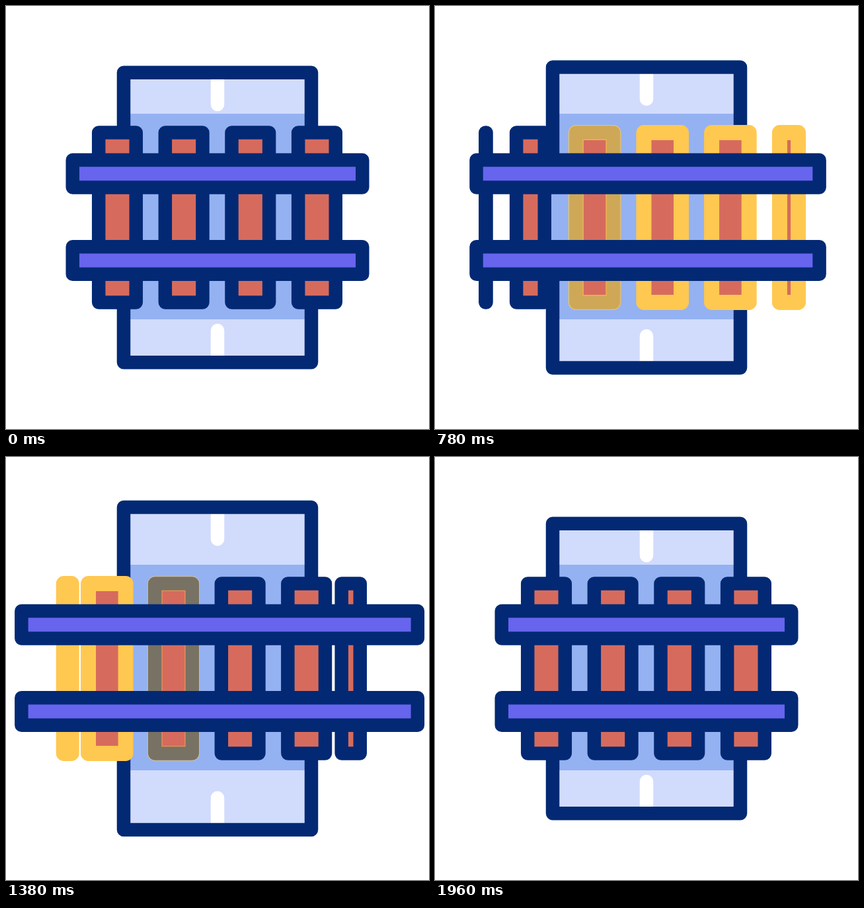
These frames come from a looping animation (640 px wide and 640 px high, 2260 ms). An HTML page with a canvas:

```html
<!DOCTYPE html>
<html lang="en">
<head>
<meta charset="utf-8">
<title>Railway crossing</title>
<style>
  html, body { margin: 0; width: 100%; height: 100%; overflow: hidden; background: #fff; }
  canvas { display: block; width: 640px; height: 640px; }
</style>
</head>
<body>
<canvas id="stage"></canvas>
<script>
const LOOP = 2260;
// Start, tightest pose, widest pose, rebound, rest
const START = 205, TIGHT = 440, WIDE = 1350, REBOUND = 1560, REST = 1950;
const NAVY = '#032974', BRICK = '#d66b5d', YELLOW = '#ffc850';
const PURPLE = '#6764ee', BLUE = '#94b1f2', PALE = '#d1dbfc';
const LINE = 20.5, GLOW = 23;
const GAP = 100.65, WIDTH = 56.6;

const canvas = document.getElementById('stage');
const ctx = canvas.getContext('2d');
const dpr = window.devicePixelRatio || 1;
canvas.width = canvas.height = 640 * dpr;

// Smooth curve through time/value pairs, flat at turning points and ends
function curve(...p) {
  const n = p.length / 2;
  const T = i => p[2 * i], V = i => p[2 * i + 1];
  const slope = i => (V(i + 1) - V(i)) / (T(i + 1) - T(i));
  const tangent = i => {
    if (i === 0 || i === n - 1) return 0;
    const a = slope(i - 1), b = slope(i);
    return a * b <= 0 ? 0 : 2 * a * b / (a + b);
  };
  return t => {
    if (t <= T(0)) return V(0);
    if (t >= T(n - 1)) return V(n - 1);
    let i = 0;
    while (t > T(i + 1)) i++;
    const h = T(i + 1) - T(i), u = (t - T(i)) / h, w = 1 - u;
    return V(i) * (1 + 2 * u) * w * w + V(i + 1) * u * u * (3 - 2 * u)
      + h * u * w * (tangent(i) * w - tangent(i + 1) * u);
  };
}

const ramp = (t, a, b) => Math.min(1, Math.max(0, (t - a) / (b - a)));

// Rails and road pinch, spread along one easing, then settle
const pinch = curve(START, 0, TIGHT, 1);
const spread = curve(TIGHT, 0, 560, 0.09, 780, 0.51, 960, 0.78, 1200, 0.955, WIDE, 1);

function edge(rest, tight, wide, rebound) {
  const settle = curve(WIDE, wide, REBOUND, rebound, REST, rest);
  return t => t > WIDE ? settle(t)
    : rest + (tight - rest) * pinch(t) + (wide - tight) * spread(t);
}

const railLeft = edge(90.5, 96, 10.5, 62.3);
const railRight = edge(549.5, 544, 637.5, 559.7);
const roadTop = edge(90.5, 101.5, 64, 93.3);

// The first sleeper narrows for a while
const tuck = curve(START, 0, 560, 1, 780, 1, 960, 0);

// Sleeper in slot i: sways left and back, glows in turn from right to left
function inner(i, glowOn) {
  const sway = curve(START, 0, 560, -15, 780, 2 * i - 29.5,
    960, i > 2 ? -35.8 : -42.6, 1200, -20.3, REBOUND, -12, REST, 0);
  const base = 140.2 + GAP * i;
  return {
    slot: i, glowOn,
    span: t => {
      const x = base + sway(t), k = i ? 0 : tuck(t);
      return [x + 12.5 * k, x + WIDTH - 1.5 * k];
    }
  };
}

// Extra sleeper that slides out from behind the row and back
function outer(slot, glowOn, middle, width) {
  return {
    slot, glowOn, extra: true,
    span: t => [middle(t) - width(t) / 2, middle(t) + width(t) / 2]
  };
}

const sleepers = [
  outer(0, [980, 1150],
    curve(560, 138, 780, 77.1, 960, 52.2, 1200, 55.5, REBOUND, 128),
    curve(960, 1.2, 1200, 24, REBOUND, 0)),
  outer(4, [0, 1],
    curve(560, 484, 780, 535.5, 960, 537, 1200, 557.5, REBOUND, 486.5),
    curve(560, 0, 780, 28, 960, WIDTH, 1200, WIDTH, REBOUND, 0)),
  inner(0, [785, 1005]),
  inner(1, [500, 850]),
  inner(2, [330, 580]),
  inner(3, [240, 440])
];

function box(x0, y0, x1, y1, color) {
  ctx.fillStyle = color;
  ctx.fillRect(x0, y0, x1 - x0, y1 - y0);
}

// Rounded outline with a square hole around the given centre lines
function outline(x0, y0, x1, y1, width, color) {
  const r = width / 2;
  ctx.beginPath();
  ctx.roundRect(x0 - r, y0 - r, x1 - x0 + width, y1 - y0 + width, r);
  if (x1 - x0 > width) ctx.rect(x0 + r, y0 + r, x1 - x0 - width, y1 - y0 - width);
  ctx.fillStyle = color;
  ctx.fill('evenodd');
}

function road(top) {
  const y = top + LINE / 2;
  box(178, y, 462, 640 - y, PALE);
  box(178, 163, 462, 474, BLUE);
  ctx.lineWidth = LINE;
  ctx.lineJoin = 'round';
  for (const flip of [false, true]) {
    const at = v => flip ? 640 - v : v;
    ctx.strokeStyle = '#fff';
    ctx.lineCap = 'round';
    ctx.beginPath();
    ctx.moveTo(320, at(y + 8));
    ctx.lineTo(320, at(top + 58.5));
    ctx.stroke();
    ctx.strokeStyle = NAVY;
    ctx.lineCap = 'butt';
    ctx.beginPath();
    ctx.moveTo(178, at(250));
    ctx.lineTo(178, at(y));
    ctx.lineTo(462, at(y));
    ctx.lineTo(462, at(250));
    ctx.stroke();
  }
  // No kerb between the rails
  box(165, 270, 475, 370, '#fff');
  box(174, 270, 466, 370, BLUE);
}

function sleeper(s, t) {
  if (s.extra && (t <= 560 || t >= REBOUND)) return;
  const [x0, x1] = s.span(t), y0 = 191.6, y1 = 448.4;
  const fade = 1422 - 111 * s.slot;
  const glow = ramp(t, ...s.glowOn) * (1 - ramp(t, fade, fade + 130));
  box(x0, y0, x1, y1, BRICK);
  if (glow < 1) outline(x0, y0, x1, y1, LINE, NAVY);
  ctx.globalAlpha = glow;
  if (glow > 0) outline(x0, y0, x1, y1, GLOW, YELLOW);
  ctx.globalAlpha = 1;
}

function rail(x0, x1, y) {
  const r = LINE / 2, h = 20.7;
  box(x0 + r, y - h, x1 - r, y + h, PURPLE);
  outline(x0 + r, y - h, x1 - r, y + h, LINE, NAVY);
}

function draw(t) {
  ctx.setTransform(dpr, 0, 0, dpr, 0, 0);
  box(0, 0, 640, 640, '#fff');
  road(roadTop(t));
  for (const s of sleepers) sleeper(s, t);
  for (const y of [253.8, 385]) rail(railLeft(t), railRight(t), y);
}

const start = performance.now();
function tick() {
  draw((performance.now() - start) % LOOP);
  requestAnimationFrame(tick);
}
tick();
</script>
</body>
</html>
```
